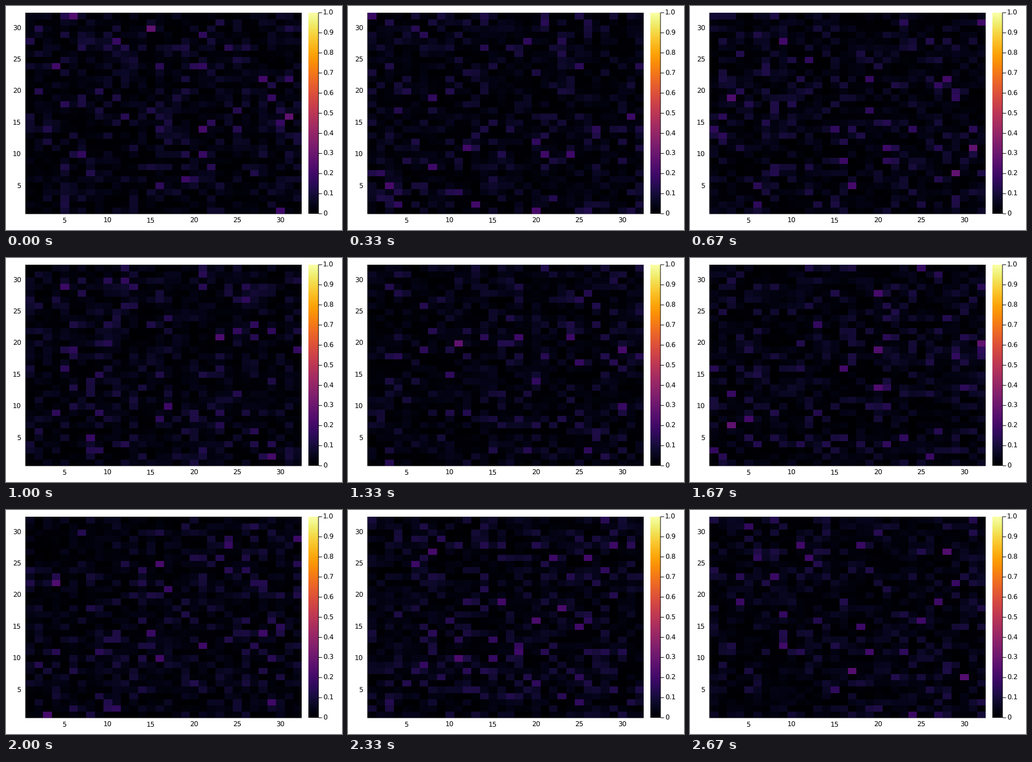
Recreate the animation shown at these times as a matplotlib script. Size 600 by 400 pixels, loop 3.01 s.

```python
import numpy as np
import matplotlib.pyplot as plt
from matplotlib.animation import FuncAnimation

W, H, DPI = 600, 400, 100
PX = 72 / DPI  # one pixel in points
LOOP, STEP = 3010, 10
STATES = 9
N = 32
MEAN = 0.037
LEFT, TOP, RIGHT, BOTTOM = 35, 12, 528, 371
BAR_L, BAR_R = 540, 558

plt.rcParams["text.hinting"] = "none"


def cell_index(size):
    """Cell number under each of `size` pixels."""
    return np.arange(size) * N // size


def make_state(k):
    """Exponentially distributed intensities, expanded to pixels."""
    grid = np.random.default_rng(40 + k).exponential(MEAN, (N, N))
    rows, cols = cell_index(BOTTOM - TOP), cell_index(RIGHT - LEFT)
    return np.minimum(grid, 0.27)[np.ix_(rows, cols)]


states = [make_state(k) for k in range(STATES)]
# State changes fall on the third parts of a second, to the nearest step
starts = [round(k * 100 / 3) * STEP for k in range(STATES)]

fig = plt.figure(figsize=(W / DPI, H / DPI), dpi=DPI, facecolor="white")
ax = fig.add_axes([0, 0, 1, 1])
ax.axis("off")


def show(data, left, right):
    return ax.imshow(data, extent=(left, right, BOTTOM, TOP), cmap="inferno",
                     vmin=0, vmax=1, aspect="auto", interpolation="nearest",
                     zorder=2)


def line(xs, ys, zorder):
    ax.plot(xs, ys, color="black", lw=PX, solid_capstyle="butt",
            snap=False, zorder=zorder)


def label(x, y, text, ha):
    ax.text(x, y, text, ha=ha, va="baseline", color="black",
            family="DejaVu Sans", size=12 * PX)


heat = show(states[0], LEFT, RIGHT)
show(np.linspace(1, 0, 256)[:, None], BAR_L, BAR_R)
ax.set_xlim(0, W)
ax.set_ylim(H, 0)

# Axes under the heatmap, so only their outer half is seen
line([LEFT, LEFT, RIGHT], [TOP, BOTTOM, BOTTOM], 1)
for t in range(5, 31, 5):
    pos = (t - 0.5) / N
    label(LEFT + pos * (RIGHT - LEFT), 387, str(t), "center")
    label(27, BOTTOM - pos * (BOTTOM - TOP) + 4, str(t), "right")

line([BAR_R, BAR_R], [TOP, BOTTOM], 3)
for i in range(11):
    y = BOTTOM - i / 10 * (BOTTOM - TOP)
    line([BAR_R, BAR_R + 6.5], [y, y], 3)
    label(566, y + 4, f"{i / 10:.1f}" if i else "0", "left")


def update(i):
    k = np.searchsorted(starts, i * STEP, side="right") - 1
    heat.set_data(states[k])
    return [heat]


anim = FuncAnimation(fig, update, frames=LOOP // STEP, interval=STEP,
                     repeat=True, repeat_delay=0, blit=False)
plt.show()
```
